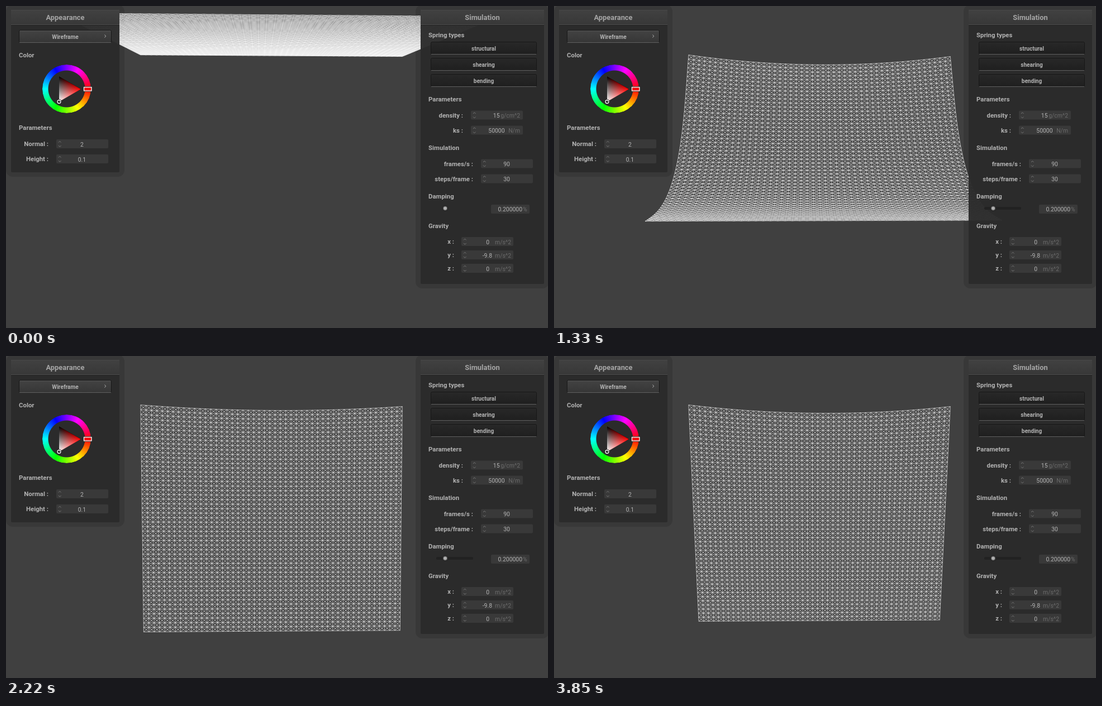
Write an HTML page with a canvas that moves like this. It is 970 px wide and 577 px high and loops after 3950 ms.

```html
<!DOCTYPE html>
<html lang="en">
<head>
<meta charset="utf-8">
<title>Cloth simulation</title>
<style>
  html, body { margin: 0; width: 100%; height: 100%; overflow: hidden; background: #404040; }
  svg, canvas { position: absolute; left: 0; top: 0; width: 970px; height: 577px; }
  text { font-family: Roboto, Arial, sans-serif; }
  .title { font-size: 12.9px; font-weight: 700; fill: #a6a6a6; }
  .label { font-size: 11.4px; font-weight: 700; fill: #b2b2b2; }
  .button { font-size: 10.1px; font-weight: 700; fill: #b2b2b2; }
  .value { font-size: 10.4px; fill: #b4b4b4; }
  .unit { font-size: 10.4px; fill: #6b6b6b; }
  .wheel {
    position: absolute; left: 65px; top: 105px; width: 87px; height: 87px; border-radius: 50%;
    background: conic-gradient(from 90deg, #f00, #ff0, #0f0, #0ff, #00f, #f0f, #f00);
    -webkit-mask: radial-gradient(circle, transparent 32.5px, #000 33.5px);
    mask: radial-gradient(circle, transparent 32.5px, #000 33.5px);
  }
  .mix { isolation: isolate; }
  .mix .add { mix-blend-mode: plus-lighter; }
</style>
</head>
<body>
<svg id="back" viewBox="0 0 970 577"></svg>
<canvas id="cloth" width="970" height="577"></canvas>
<svg id="panels" viewBox="0 0 970 577">
  <defs>
    <linearGradient id="head" x2="0" y2="1"><stop stop-color="#414141"/><stop offset="1" stop-color="#383838"/></linearGradient>
    <linearGradient id="raised" x2="0" y2="1"><stop stop-color="#434343"/><stop offset="1" stop-color="#363636"/></linearGradient>
    <linearGradient id="pushed" x2="0" y2="1"><stop stop-color="#282828"/><stop offset="1" stop-color="#1f1f1f"/></linearGradient>
    <linearGradient id="red" gradientUnits="userSpaceOnUse" x1="95" y1="149" x2="134" y2="149"><stop stop-color="#000"/><stop offset="1" stop-color="#f00"/></linearGradient>
    <linearGradient id="white" gradientUnits="userSpaceOnUse" x1="114.5" y1="137.5" x2="95" y2="171.5"><stop stop-color="#000"/><stop offset="1" stop-color="#fff"/></linearGradient>
  </defs>
</svg>
<div class="wheel"></div>
<svg viewBox="0 0 970 577">
  <g class="mix">
    <path d="M95 126.5L134 149L95 171.5Z" fill="url(#red)"/>
    <path class="add" d="M95 126.5L134 149L95 171.5Z" fill="url(#white)"/>
  </g>
  <rect x="139.5" y="145.5" width="13.5" height="6.5" fill="#f01010" stroke="#222" stroke-width="3"/>
  <rect x="139.5" y="145.5" width="13.5" height="6.5" fill="#f01010" stroke="#fff" stroke-width="1.3"/>
  <circle cx="95" cy="171.5" r="3" fill="none" stroke="#111" stroke-width="3"/>
  <circle cx="95" cy="171.5" r="3" fill="none" stroke="#fff" stroke-width="1.3"/>
</svg>
<script>
const NS = 'http://www.w3.org/2000/svg';
const back = document.getElementById('back');
const front = document.getElementById('panels');

function add(parent, tag, attrs, content) {
  const el = document.createElementNS(NS, tag);
  for (const key in attrs) el.setAttribute(key, attrs[key]);
  if (content !== undefined) el.textContent = content;
  parent.appendChild(el);
  return el;
}
const rect = (x, y, width, height, fill, more) =>
  add(front, 'rect', { x, y, width, height, fill, ...more });
const stroke = (d, color) => add(front, 'path', { d, fill: 'none', stroke: color });
const dot = (cx, cy, r, fill, edge = 'none') => add(front, 'circle', { cx, cy, r, fill, stroke: edge });
// y is the middle of the line of text
const text = (x, y, cls, str, anchor = 'start') =>
  add(front, 'text', { x, y: y + 4, class: cls, 'text-anchor': anchor }, str);

function panel(x, w, h, title) {
  add(back, 'rect', { x: x - 9, y: -2, width: w + 18, height: h + 17, rx: 12, fill: '#383838' });
  rect(x, 7, w, h, '#2b2b2b', { rx: 2, 'fill-opacity': 0.96 });
  rect(x, 7, w, 26, 'url(#head)');
  stroke(`M${x} 7.5h${w}`, '#484848');
  stroke(`M${x} 33.5h${w}`, '#4c4c4c');
  stroke(`M${x} 34.5h${w}`, '#202020');
  text(x + w / 2, 20.5, 'title', title, 'middle');
}

function button(x, y, w, label, style) {
  rect(x - 0.5, y - 0.5, w + 1, 22, `url(#${style})`, { rx: 2, stroke: '#171717' });
  stroke(`M${x} ${y + 21.5}h${w}`, '#606060');
  if (style === 'raised') stroke(`M${x + 1} ${y + 0.5}h${w - 2}`, '#565656');
  text(x + w / 2, y + 11, 'button', label, 'middle');
}

function field(right, y, label, x, value, end, unit, unitEnd) {
  text(right, y, 'label', label, 'end');
  rect(x, y - 8, 93, 16, '#393939', { rx: 2 });
  stroke(`M${x + 4} ${y - 2.5}l2.3 -2.3l2.3 2.3m0 5.5l-2.3 2.3l-2.3 -2.3`, '#777');
  if (unit) {
    text(end, y + 0.5, 'value', value, 'end');
    text(unitEnd, y + 0.5, 'unit', unit, 'end');
  } else {
    text(x + 46, y + 0.5, 'value', value, 'middle');
  }
}

panel(9, 194, 291, 'Appearance');
button(24, 44, 164, 'Wireframe', 'raised');
stroke('M176.5 51.5l2.2 2.5l-2.2 2.5', '#b2b2b2');
text(23, 87.5, 'label', 'Color');
text(23, 218, 'label', 'Parameters');
field(76, 247, 'Normal :', 90, '2');
field(76, 274, 'Height :', 90, '0.1');

panel(742, 221, 491, 'Simulation');
text(756, 51.5, 'label', 'Spring types');
['structural', 'shearing', 'bending'].forEach((name, i) => button(761, 65 + 29 * i, 188, name, 'pushed'));
text(756, 166.5, 'label', 'Parameters');
field(818, 195.5, 'density :', 832, '15', 883.5, 'g/cm^2', 920);
field(818, 222.5, 'ks :', 832, '50000', 892.5, 'N/m', 920);
text(756, 253.5, 'label', 'Simulation');
field(836, 282.5, 'frames/s :', 850, '90');
field(836, 309.5, 'steps/frame :', 850, '30');
text(756, 341, 'label', 'Damping');
const track = rect(770, 360, 66, 5, '#222', { rx: 2 });
dot(786, 362.5, 5, '#484848', '#1f1f1f');
dot(786, 362.5, 3, '#b0b0b0');
rect(868, 356, 69, 16, '#393939', { rx: 2 });
text(924, 364, 'value', '0.200000', 'end');
text(932.5, 364, 'unit', '%', 'end');
text(756, 393.5, 'label', 'Gravity');
field(802, 422, 'x :', 815, '0', 865, 'm/s^2', 904);
field(802, 446, 'y :', 815, '-9.8', 870, 'm/s^2', 904);
field(802, 470, 'z :', 815, '0', 865, 'm/s^2', 904);

// Cloth, hung from two pins; lengths are in cloth widths
const LOOP = 3950, FIRST = 442, STEP = 147.8, CELLS = 49;
const FOCAL = 1009, DEPTH = 2.155, YAW = 0.03, TILT = 0.092;
const COS = Math.cos(TILT), SIN = Math.sin(TILT);

const logistic = x => 1 / (1 + Math.exp(-x));
const bump = (t, mid, width) => Math.exp(-(((t - mid) / width) ** 2));

function project(u, down, away) {
  const x = -0.0192 + u - YAW * away;
  const y = -0.427 + COS * down - SIN * away;
  const z = DEPTH + YAW * u + COS * away + SIN * down;
  return [485.7 + FOCAL * x / z, 289 + FOCAL * y / z];
}

// Slope at height v (0 pins, 1 hem): 0 points at the viewer, 90 straight down.
// The whole sheet swings, and the bend runs from the pins to the hem.
function slope(v, t) {
  const left = Math.max(0, 1 - (t - 890) / 2200);
  const swing = 97 - 44 * left ** 1.7;
  const bendTime = 600 + 1115 * v ** 0.85;
  const bendWidth = 65 + 390 * v * (1 - v);
  return swing * logistic((t - bendTime) / bendWidth) * Math.PI / 180;
}

const clothLength = t => 0.868 + 0.05 * bump(t, 700, 600) + 0.009 * t / LOOP;

// Extra drop of the top middle: a first plunge, then a damped bounce
function sagAt(t) {
  const age = t - 900;
  const bounce = 0.026 + 0.02 * Math.exp(-age / 1500) * Math.cos(2 * Math.PI * age / 2700);
  return bounce * logistic((t - 500) / 45) + 0.04 * bump(t, 720, 130);
}

function mesh(t) {
  const link = clothLength(t) / CELLS, sag = sagAt(t), rows = [];
  let down = 0, away = 0;
  for (let r = 0; r <= CELLS; r++) {
    const v = r / CELLS, row = [];
    for (let c = 0; c <= CELLS; c++) {
      const u = c / CELLS - 0.5;
      row.push(project(u, down + sag * (1 - 4 * u * u) * (1 - v) ** 3, away));
    }
    rows.push(row);
    const angle = slope(Math.min(1, v + 0.5 / CELLS), t);
    down += Math.sin(angle) * link;
    away -= Math.cos(angle) * link;
  }
  return rows;
}

const ctx = document.getElementById('cloth').getContext('2d');
ctx.strokeStyle = '#fff';
ctx.lineWidth = 0.6;
ctx.lineJoin = 'bevel';

function polyline(pointAt) {
  ctx.beginPath();
  for (let i = 0; i <= CELLS; i++) ctx.lineTo(...pointAt(i));
  ctx.stroke();
}

function draw(t) {
  const m = mesh(t);
  ctx.clearRect(0, 0, 970, 577);
  for (let n = 0; n <= CELLS; n++) {
    polyline(i => m[n][i]);
    polyline(i => m[i][n]);
    if (n === CELLS) break;
    // two opposite zigzags cross every cell of the row
    polyline(i => m[n + i % 2][i]);
    polyline(i => m[n + (i + 1) % 2][i]);
  }
  track.setAttribute('visibility', t > 1300 ? 'visible' : 'hidden');
}

let shown = -1;
const start = performance.now();
function tick(now) {
  const t = Math.max(0, now - start) % LOOP;
  const step = t < FIRST ? 0 : FIRST + STEP * Math.floor((t - FIRST) / STEP);
  if (step !== shown) draw(shown = step);
  requestAnimationFrame(tick);
}
tick(start);
</script>
</body>
</html>
```
